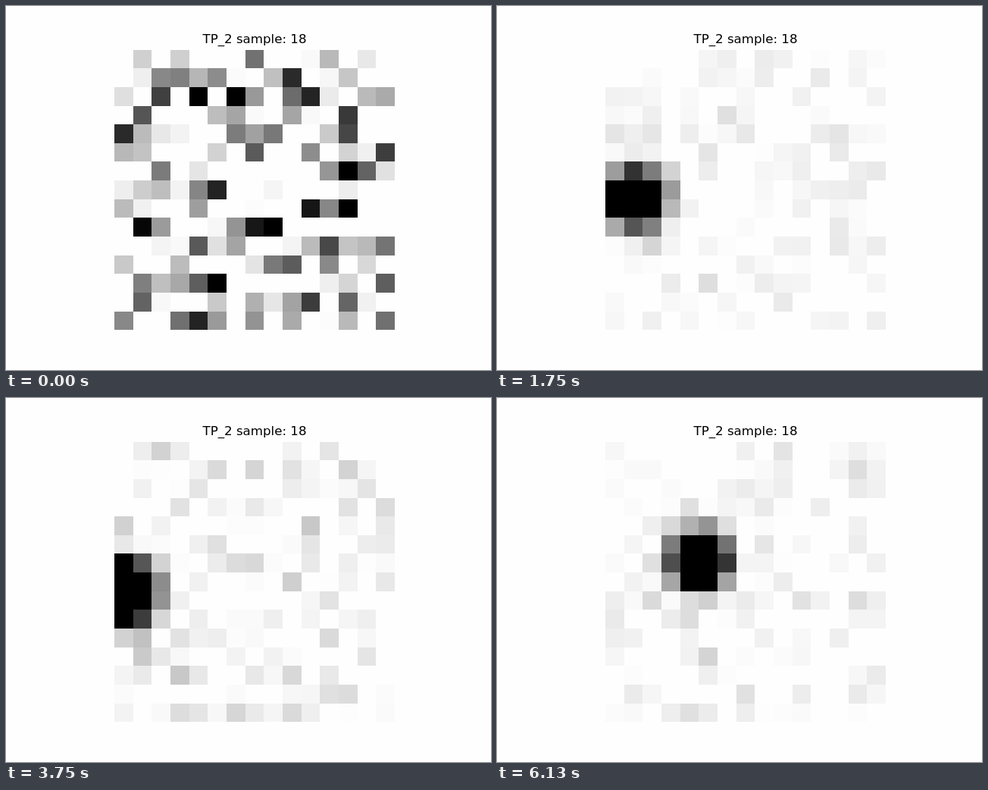
Recreate the animation shown at these times as an HTML page with a canvas. Size 640 by 480 pixels, loop 6260 ms.

```html
<!DOCTYPE html>
<html lang="en">
<head>
<meta charset="utf-8">
<title>Sample heat map</title>
<style>
  html, body { margin: 0; width: 100%; height: 100%; overflow: hidden; }
  canvas { display: block; width: 640px; height: 480px; }
</style>
</head>
<body>
<canvas id="stage" width="640" height="480"></canvas>
<script>
const ctx = document.getElementById('stage').getContext('2d');
const LOOP = 6260, STEP = 125, LAST = 49;
const N = 15, CELL = 24.64, LEFT = 143.2, TOP = 57.6;
const PEAK = 45, FALLOFF = 0.55, CLIPPED = 6;

// Blob centre in cells: [step, column, row]
const path = [
  [0, -5, 9], [6, -1.8, 8.5], [14, 1.1, 7.45], [25, 0.1, 7.25],
  [35, 0.5, 7.8], [43, 2.4, 6.75], [49, 4.55, 5.8]
];

const edgeX = k => Math.round(LEFT + k * CELL);
const edgeY = k => Math.round(TOP + k * CELL);

function random(seed) {
  let a = seed;
  return () => {
    a = (a + 0x6D2B79F5) | 0;
    let t = Math.imul(a ^ (a >>> 15), a | 1);
    t ^= t + Math.imul(t ^ (t >>> 7), t | 61);
    return ((t ^ (t >>> 14)) >>> 0) / 4294967296;
  };
}

function slope(k, axis) {
  const a = path[Math.max(0, k - 1)], b = path[Math.min(path.length - 1, k + 1)];
  return (b[axis] - a[axis]) / (b[0] - a[0]);
}

// Smooth cubic through the path points
function along(step, axis) {
  const k = Math.max(1, path.findIndex(p => p[0] >= step));
  const a = path[k - 1], b = path[k], d = b[0] - a[0];
  const u = (step - a[0]) / d, w = 1 - u;
  return w * w * (1 + 2 * u) * a[axis] + u * u * (1 + 2 * w) * b[axis]
    + d * u * w * (w * slope(k - 1, axis) - u * slope(k, axis));
}

// Gaussian noise plus the blob, cut off below zero
function field(step) {
  const rnd = random(step * 7919 + 18);
  const cx = along(step, 1), cy = along(step, 2);
  return Array.from({ length: N * N }, (_, i) => {
    const noise = Math.sqrt(-2 * Math.log(1 - rnd())) * Math.cos(2 * Math.PI * rnd());
    const dx = i % N - cx, dy = Math.floor(i / N) - cy;
    return Math.max(0, noise + PEAK * Math.exp(-FALLOFF * (dx * dx + dy * dy)));
  });
}

function tone(v) {
  const g = Math.round(254 * (1 - Math.min(1, v)));
  return `rgb(${g},${g},${g})`;
}

function draw(step) {
  const cells = field(step);
  // Each picture is scaled so that its few largest cells are black
  const top = [...cells].sort((a, b) => b - a)[CLIPPED - 1];
  ctx.fillStyle = tone(0);
  ctx.fillRect(0, 0, 640, 480);
  cells.forEach((v, i) => {
    const c = i % N, r = Math.floor(i / N), x = edgeX(c), y = edgeY(r);
    ctx.fillStyle = tone(v / top);
    ctx.fillRect(x, y, edgeX(c + 1) - x, edgeY(r + 1) - y);
  });
  ctx.fillStyle = '#000';
  ctx.font = '16.67px "DejaVu Sans", sans-serif';
  ctx.textAlign = 'center';
  ctx.fillText('TP_2 sample: 18', 328, 49);
}

let shown = -1;
const start = performance.now();
function tick(now) {
  const t = Math.max(0, now - start) % LOOP;
  const step = Math.min(LAST, Math.floor(Math.floor(t / 10) * 10 / STEP));
  if (step !== shown) draw(shown = step);
  requestAnimationFrame(tick);
}
tick(start);
</script>
</body>
</html>
```
